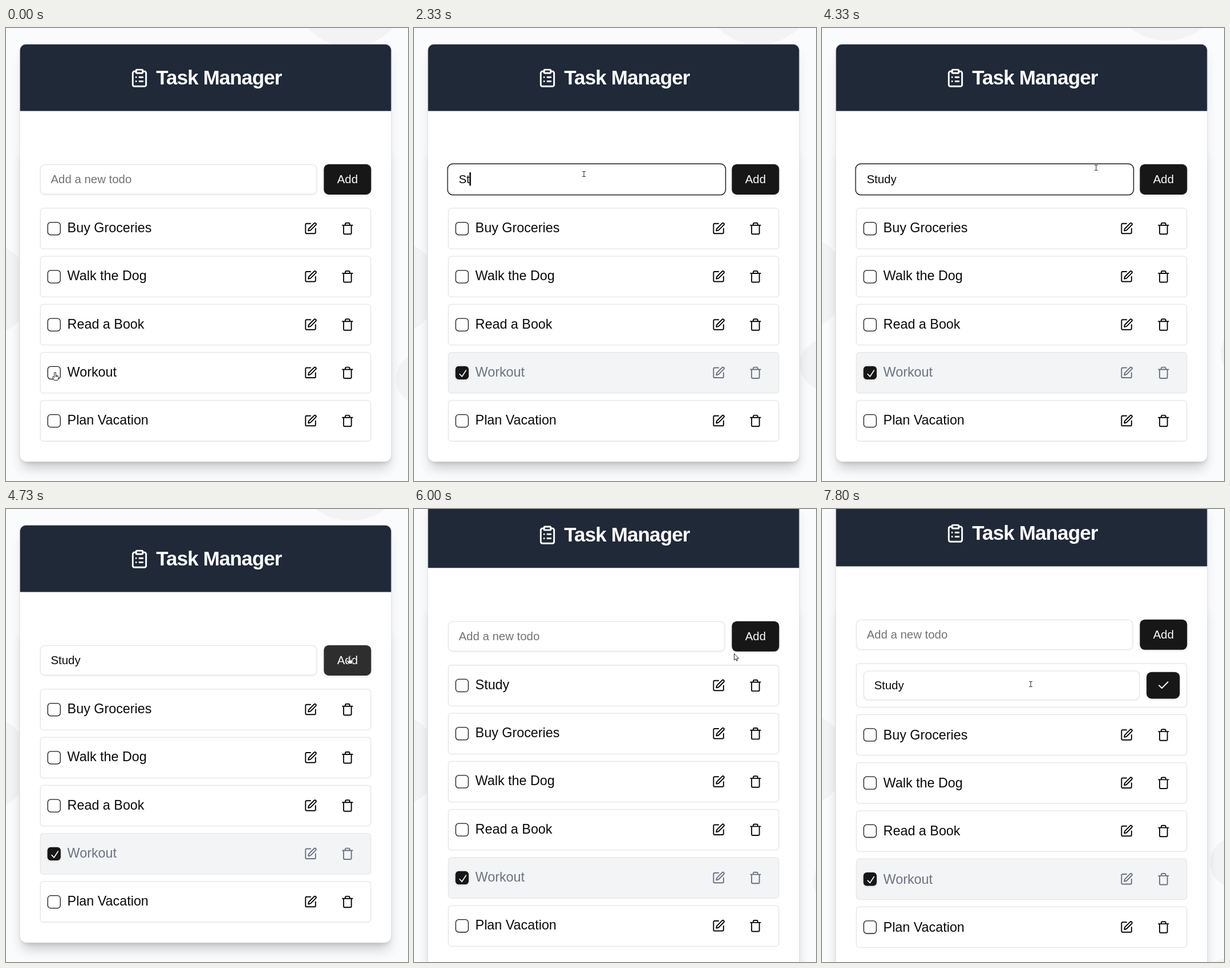
These frames come from a looping animation (705 by 794 pixels, 8 s). An HTML page:

```html
<!DOCTYPE html>
<html lang="en">
<head>
<meta charset="utf-8">
<title>Task Manager</title>
<style>
  * { box-sizing: border-box; }
  html, body { margin: 0; width: 100%; height: 100%; overflow: hidden; }
  body { position: relative; background: #fafbfd; color: #0a0a0a; font: 16px/24px "Liberation Sans", Arial, sans-serif; }
  svg { display: block; width: 16px; height: 16px; fill: none; stroke: currentColor; stroke-width: 2; stroke-linecap: round; stroke-linejoin: round; }
  .blob { position: absolute; border-radius: 50%; background: #f2f3f5; }

  /* The card stays centred as it grows */
  #page { position: absolute; left: 350px; top: 394.3px; transform: translate(-50%, -50%) scale(1.2963); }
  .card { zoom: 1.125; width: 448px; border: 1px solid #e5e5e5; border-radius: 8px; background: #fff; }
  .card, .content { box-shadow: 0 10px 15px -3px #0000001a, 0 4px 6px -4px #0000001a; }
  .header { height: 80px; display: flex; align-items: center; justify-content: center; gap: 8px;
    border-radius: 7px 7px 0 0; background: #1f2937; color: #fff; font-size: 24px; font-weight: bold; letter-spacing: -.025em; }
  .header svg { width: 24px; height: 24px; }
  .content { margin-top: 40px; padding: 24px; border-radius: 8px; background: #fff; }
  .form { display: flex; gap: 8px; margin-bottom: 16px; }
  #list { display: flex; flex-direction: column; gap: 8px; }

  .field { flex: 1; height: 36px; padding-left: 12px; display: flex; align-items: center; white-space: pre;
    border: 1px solid #e5e5e5; border-radius: 6px; font-size: 14px; box-shadow: 0 1px 2px #0000000d; }
  .field.focus { box-shadow: 0 0 0 1px #0a0a0a; }
  #hint { color: #737373; }
  #caret { width: 1px; height: 16px; margin-right: -1px; background: #0a0a0a; }
  .button { display: grid; place-items: center; border-radius: 6px; font-size: 14px; }
  .dark { background: #171717; color: #fafafa; box-shadow: 0 1px 3px #0000001a; }
  #add { height: 36px; padding: 0 16px; }

  .row { padding: 8px; display: flex; align-items: center; border: 1px solid #e5e5e5; border-radius: 4px; --done: 0%;
    color: color-mix(in srgb, #0a0a0a, #6b7280 var(--done));
    background: color-mix(in srgb, #fff, #f3f4f6 var(--done)); }
  .box { width: 16px; height: 16px; display: grid; place-items: center; border: 1px solid #171717; border-radius: 4px;
    color: transparent; box-shadow: 0 1px 3px #0000001a; }
  .box svg { stroke-width: 1.1; }
  .checked .box { background: #171717; color: #fafafa; }
  .label { flex: 1; margin-left: 8px; }
  .row .button { width: 40px; height: 32px; margin-left: 4px; }
  .row .save { margin-left: 8px; }
  .row:not(.editing) > :is(.field, .save), .editing > :not(.field, .save) { display: none; }

  #cursor { position: absolute; left: 0; top: 0; overflow: visible; stroke: #222; stroke-width: 1; fill: #fff; pointer-events: none; }
</style>
</head>
<body>
<div id="page">
  <div class="card">
    <div class="header">
      <svg viewBox="0 0 24 24"><rect x="8" y="2" width="8" height="4" rx="1"/><path d="M16 4h2a2 2 0 0 1 2 2v14a2 2 0 0 1-2 2H6a2 2 0 0 1-2-2V6a2 2 0 0 1 2-2h2M12 11h4M12 16h4M8 11h.01M8 16h.01"/></svg>
      <span>Task Manager</span>
    </div>
    <div class="content">
      <div class="form">
        <div class="field" id="field"><span id="entry"></span><i id="caret"></i><span id="hint">Add a new todo</span></div>
        <div class="button dark" id="add">Add</div>
      </div>
      <div id="list"></div>
    </div>
  </div>
</div>
<svg id="cursor"><path id="pointer"/></svg>

<script>
const LOOP = 8000, CHECKED = 200, FOCUS = 1270, BLUR = 4730, ADDED = 4870, EDITING = 7130, BLINK = 530;
const WORD = 'Study', KEY_TIMES = [2130, 2330, 2600, 2730, 3400];
const $ = id => document.getElementById(id);

const icon = (d, size = 24) => `<svg viewBox="0 0 ${size} ${size}"><path d="${d}"/></svg>`;
const pen = icon('M12 3H5a2 2 0 0 0-2 2v14a2 2 0 0 0 2 2h14a2 2 0 0 0 2-2v-7M18.375 2.625a1 1 0 0 1 3 3l-9.013 9.014a2 2 0 0 1-.853.505l-2.873.84a.5.5 0 0 1-.62-.62l.84-2.873a2 2 0 0 1 .506-.852z');
const trash = icon('M3 6h18M19 6v14c0 1-1 2-2 2H7c-1 0-2-1-2-2V6M8 6V4c0-1 1-2 2-2h4c1 0 2 1 2 2v2');
const tick = icon('M4 12l5 5L20 6');
const smallTick = icon('M4 8.2l2.6 2.7L11.1 4', 15);

$('list').innerHTML = [WORD, 'Buy Groceries', 'Walk the Dog', 'Read a Book', 'Workout', 'Plan Vacation'].map(name => `
  <div class="row" id="${name.split(' ')[0]}">
    <div class="box">${smallTick}</div><span class="label">${name}</span>
    <div class="button edit">${pen}</div><div class="button">${trash}</div>
    <div class="field">${name}</div><div class="button dark save">${tick}</div>
  </div>`).join('');
const study = $('Study'), workout = $('Workout'), editButton = study.querySelector('.edit');

const ramp = (t, start, length) => Math.min(1, Math.max(0, (t - start) / length));
const ease = p => p * p * (3 - 2 * p);
const drift = t => 9.7 * (1 - Math.cos(Math.PI * t / LOOP));

const blobs = [
  { r: 102, at: t => [604, -69 - drift(t)] },
  { r: 82, at: t => [-38, 458 - drift(t)] },
  { r: 44, at: t => [719 + ((t - 1630) / 550) ** 2, 615 - t / 94] },
  { r: 44, at: t => [810 - t / 91, 760 - t / 55.7] },
  { r: 40, at: t => [752 - 40 * ramp(t, ADDED, 2200), 827] }
];
for (const blob of blobs) {
  blob.el = document.createElement('div');
  blob.el.className = 'blob';
  blob.el.style.width = blob.el.style.height = blob.r * 2 + 'px';
  document.body.prepend(blob.el);
}

// Each move follows a quadratic curve bent towards "via"
const REST = [86, 604];
const moves = [
  { start: 530, length: 630, via: [401, 303], to: [298, 256] },
  { start: 4130, length: 350, via: [444, 231], to: [602, 258] },
  { start: 5870, length: 730, via: [345, 230], to: [534, 305] },
  { start: 7200, length: 270, via: [450, 270], to: [366, 286] },
  { start: 7670, length: 130, via: [366, 296], to: [366, 307] }
];
const shapes = {
  arrow: 'M0 0V11L2.6 8.6 4.4 12.4 6 11.6 4.4 8H7.6Z',
  hand: 'M0-.5Q1.4-.5 1.4 1V5L5 5.8Q6 6.2 6 7.3V10L4.6 13.5H-1.2L-4.5 8.6Q-4.6 6.6-2.8 7L-1.4 8.6V1Q-1.4-.5 0-.5ZM1.4 5V7.5M3.5 5.5V7.5',
  beam: 'M-2.5-4.5H-.7L0-4 .7-4.5H2.5M0-4V4M-2.5 4.5H-.7L0 4 .7 4.5H2.5'
};

function mouseAt(t) {
  return moves.reduce((from, { start, length, via, to }) => {
    const u = ease(ramp(t, start, length));
    return from.map((a, i) => (1 - u) ** 2 * a + 2 * u * (1 - u) * via[i] + u * u * to[i]);
  }, REST);
}

function shapeAt(x, y) {
  const target = document.elementFromPoint(x, y);
  if (target?.closest('.field')) return 'beam';
  return target?.closest('.button, .box') ? 'hand' : 'arrow';
}

function renderField(t) {
  const typedCount = KEY_TIMES.filter(at => at <= t).length;
  const text = t < ADDED ? WORD.slice(0, typedCount) : '';
  const lastChange = typedCount ? KEY_TIMES[typedCount - 1] : FOCUS;
  const focused = t >= FOCUS && t < BLUR;
  $('entry').textContent = text;
  $('hint').hidden = text !== '';
  $('caret').hidden = !focused || Math.floor((t - lastChange) / BLINK) % 2 === 1;
  $('field').classList.toggle('focus', focused);
}

function renderCursor(t) {
  const [x, y] = mouseAt(t), shape = shapeAt(x, y);
  $('pointer').setAttribute('d', shapes[shape]);
  $('pointer').setAttribute('fill', shape === 'beam' ? 'none' : '#fff');
  $('pointer').setAttribute('transform', `translate(${x} ${y})`);
}

function render(t) {
  for (const { el, r, at } of blobs) {
    const [x, y] = at(t);
    el.style.transform = `translate(${x - r}px, ${y - r}px)`;
  }
  study.style.display = t < ADDED ? 'none' : '';
  study.classList.toggle('editing', t >= EDITING);
  workout.classList.toggle('checked', t >= CHECKED);
  workout.style.setProperty('--done', ramp(t, CHECKED - 20, 150) * 100 + '%');

  const addHover = ramp(t, 4400, 150) - ramp(t, ADDED + 10, 80);
  $('add').style.background = `color-mix(in srgb, #171717, #2e2e2e ${addHover * 100}%)`;
  editButton.style.background = `rgb(245 245 245 / ${ramp(t, 6450, 150)})`;
  renderField(t);
  renderCursor(t);
}

const start = performance.now();
function frame() {
  render((performance.now() - start) % LOOP);
  requestAnimationFrame(frame);
}
frame();
</script>
</body>
</html>
```
